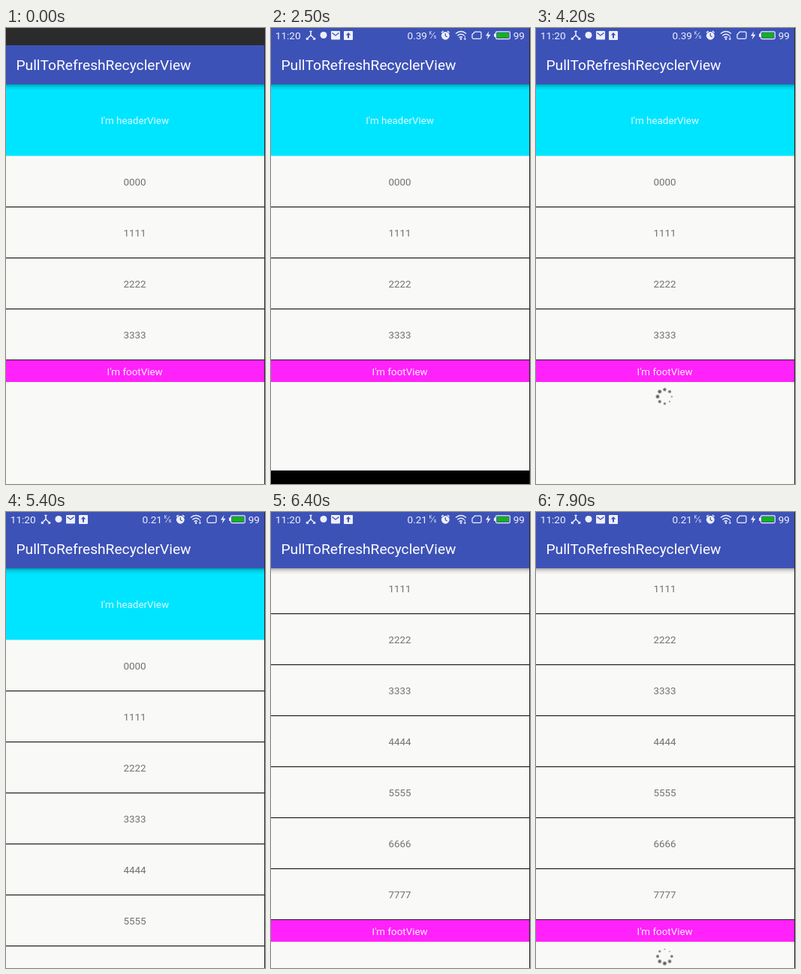
These frames come from a looping animation (345 by 608 pixels, 8 s). An HTML page:

```html
<!DOCTYPE html>
<html lang="en">
<head>
<meta charset="utf-8">
<title>List demo</title>
<style>
html, body { margin: 0; width: 100%; height: 100%; overflow: hidden; background: #f9faf7; }
svg { display: block; width: 345px; height: 608px; font-family: Roboto, "Noto Sans", sans-serif; }
.mid { text-anchor: middle; font-size: 13.4px; }
.row text { fill: #727272; }
.row rect { fill: #202020; }
.status text { font-size: 13.6px; }
.ball { fill: #5f5f5f; transform-box: fill-box; transform-origin: center; animation: ball 1s infinite; }

.boot, .nav, .list, .short, .long, .spin1, .spin2, .fast, .slow, .fade {
  animation: 8s step-end infinite;
}
.boot { animation-name: boot; }
.nav { animation-name: nav; }
.list { animation-name: scroll; }
.short { animation-name: short; }
.long { animation-name: long; }
.spin1 { animation-name: spin1; }
.spin2 { animation-name: spin2; }
.fast { animation-name: fast; }
.slow { animation-name: slow; }
.fade { animation-name: fade; }

@keyframes boot { 0% { opacity: 1 } 1.25%, 100% { opacity: 0 } }
@keyframes nav { 0% { opacity: 0 } 7.5% { opacity: 1 } 42.5%, 100% { opacity: 0 } }
@keyframes short { 0% { opacity: 1 } 65%, 100% { opacity: 0 } }
@keyframes long { 0% { opacity: 0 } 65%, 100% { opacity: 1 } }
@keyframes fade { 0% { opacity: .35 } 66.25% { opacity: .8 } 67.5%, 100% { opacity: 1 } }
@keyframes spin1 { 0% { opacity: 0 } 32.5%, 100% { opacity: 1 } }
@keyframes spin2 { 0% { opacity: 0 } 81.25%, 100% { opacity: 1 } }
@keyframes fast { 0% { opacity: 1 } 58.75%, 100% { opacity: 0 } }
@keyframes slow { 0% { opacity: 0 } 58.75%, 100% { opacity: 1 } }
@keyframes scroll {
  0% { transform: translateY(0) }
  76.25% { transform: translateY(-22px) }
  77.5% { transform: translateY(-79px) }
  78.75% { transform: translateY(-136px) }
  80%, 100% { transform: translateY(-171px) }
}
@keyframes ball {
  0% { transform: scale(1); opacity: 1; animation-timing-function: ease-in }
  50% { transform: scale(.4); opacity: .4; animation-timing-function: ease-out }
  100% { transform: scale(1); opacity: 1 }
}
</style>
</head>
<body>
<svg viewBox="0 0 345 608">
  <defs>
    <linearGradient id="shade" x2="0" y2="1">
      <stop offset="0" stop-opacity=".32"/>
      <stop offset=".45" stop-opacity=".1"/>
      <stop offset="1" stop-opacity="0"/>
    </linearGradient>
    <g id="foot">
      <rect width="345" height="29" fill="#ff22fb"/>
      <text class="mid" x="171.6" y="20" fill="#fff" fill-opacity=".92">I'm footView</text>
    </g>
  </defs>
  <rect width="345" height="608" fill="#f9faf7"/>

  <g class="list">
    <rect y="74" width="345" height="96.5" fill="#00e5ff"/>
    <text class="mid" x="171.6" y="128" fill="#fff" fill-opacity=".85">I'm headerView</text>
    <g id="first"></g>
    <g class="short">
      <use href="#foot" y="443"/>
      <g class="spin1"><g class="spinner" transform="translate(171.4 491.5)"></g></g>
    </g>
    <g class="long">
      <g id="more"></g>
      <use href="#foot" y="715"/>
      <g class="spin2"><g class="spinner" transform="translate(171.4 763.5)"></g></g>
    </g>
  </g>

  <rect y="75" width="345" height="8" fill="url(#shade)"/>
  <rect width="345" height="75" fill="#3d52b7"/>
  <text x="13.5" y="55.5" font-size="19.2" fill="#fff">PullToRefreshRecyclerView</text>

  <g class="status" fill="#eef0fb">
    <text x="5.8" y="14.6">11:20</text>
    <g stroke="#eef0fb" stroke-width="1.5" fill="none" stroke-linecap="round">
      <path d="M53 5V9.5L48 14.5M53 9.5L58 14.5"/>
      <path d="M52 4.5h2M47.5 13.5v1.5h2M58.5 13.5v1.5h-2"/>
    </g>
    <circle cx="70" cy="9.5" r="4.5"/>
    <rect x="80" y="4" width="12" height="11.5" rx="1"/>
    <path d="M81.5 6.5L86 10L90.5 6.5" fill="none" stroke="#3d52b7" stroke-width="1.3"/>
    <rect x="97" y="4" width="12" height="12" rx="1"/>
    <path d="M103 6L106.2 9.6H104V13.5H102V9.6H99.8Z" fill="#3d52b7"/>

    <text class="fast" x="181.5" y="14.6">0.39</text>
    <text class="slow" x="181.5" y="14.6">0.21</text>
    <text x="210.5" y="9" style="font-size:6.5px">K</text>
    <text x="216.5" y="14" style="font-size:7.5px">s</text>
    <path d="M212.5 14L218 5.5" stroke="#eef0fb" stroke-width=".8"/>

    <circle cx="232.3" cy="10.3" r="5.4"/>
    <path d="M227 6.3L229.6 4M237.6 6.3L235 4" stroke="#eef0fb" stroke-width="1.5"/>
    <path d="M232.3 7V10.5L234.8 12" fill="none" stroke="#3d52b7" stroke-width="1.2"/>

    <g fill="none" stroke="#eef0fb" stroke-width="1.4">
      <path d="M246 7.5Q253 1.5 260 7.5M248.3 10.2Q253 6.2 257.7 10.2M250.5 12.8Q253 10.8 255 12.5"/>
      <path d="M258.3 10.5V15.5M256.8 14L258.3 15.7L259.8 14" stroke-width="1"/>
      <path d="M271.5 5.2H278.5Q280 5.2 280 6.7V12.8Q280 14.3 278.5 14.3H269.5Q268 14.3 268 12.8V8.7Z" stroke-width="1.3"/>
      <rect x="299.5" y="4.8" width="18.8" height="9.8" rx="1.5" stroke-width="1.2"/>
    </g>
    <circle cx="253" cy="14.6" r="1.3"/>
    <path d="M290.5 4L286 10.5H289L287.7 15.5L292.5 8.7H289.3Z"/>
    <rect x="297" y="7.5" width="2" height="4.4"/>
    <rect x="301" y="6.3" width="15.8" height="6.8" fill="#17b01c"/>
    <text x="322.7" y="14.6">99</text>
  </g>

  <rect class="boot" width="345" height="23" fill="#2b2b2b"/>
  <rect class="nav" y="590" width="345" height="18"/>
  <rect x="344" width="1" height="608" fill="#2a2a2a"/>
</svg>
<script>
const row = (i, cls = "") => {
  const y = 170 + i * 68;
  return `<g class="row"><g class="${cls}"><text class="mid" x="171.6" y="${y + 40}">${String(i).repeat(4)}</text></g>` +
    `<rect y="${y + 68}" width="345" height="1.2"/></g>`;
};
const ball = i => {
  const a = i * Math.PI / 4;
  const delay = (i === 7 ? 0.78 : i * 0.12) - 1.36;
  return `<circle class="ball" cx="${9.4 * Math.cos(a)}" cy="${9.4 * Math.sin(a)}" r="2.4" style="animation-delay:${delay}s"/>`;
};
document.getElementById("first").innerHTML = [0, 1, 2, 3].map(i => row(i)).join("");
document.getElementById("more").innerHTML = [4, 5, 6, 7].map(i => row(i, "fade")).join("");
document.querySelectorAll(".spinner").forEach(s => {
  s.innerHTML = [...Array(8).keys()].map(ball).join("");
});
</script>
</body>
</html>
```
